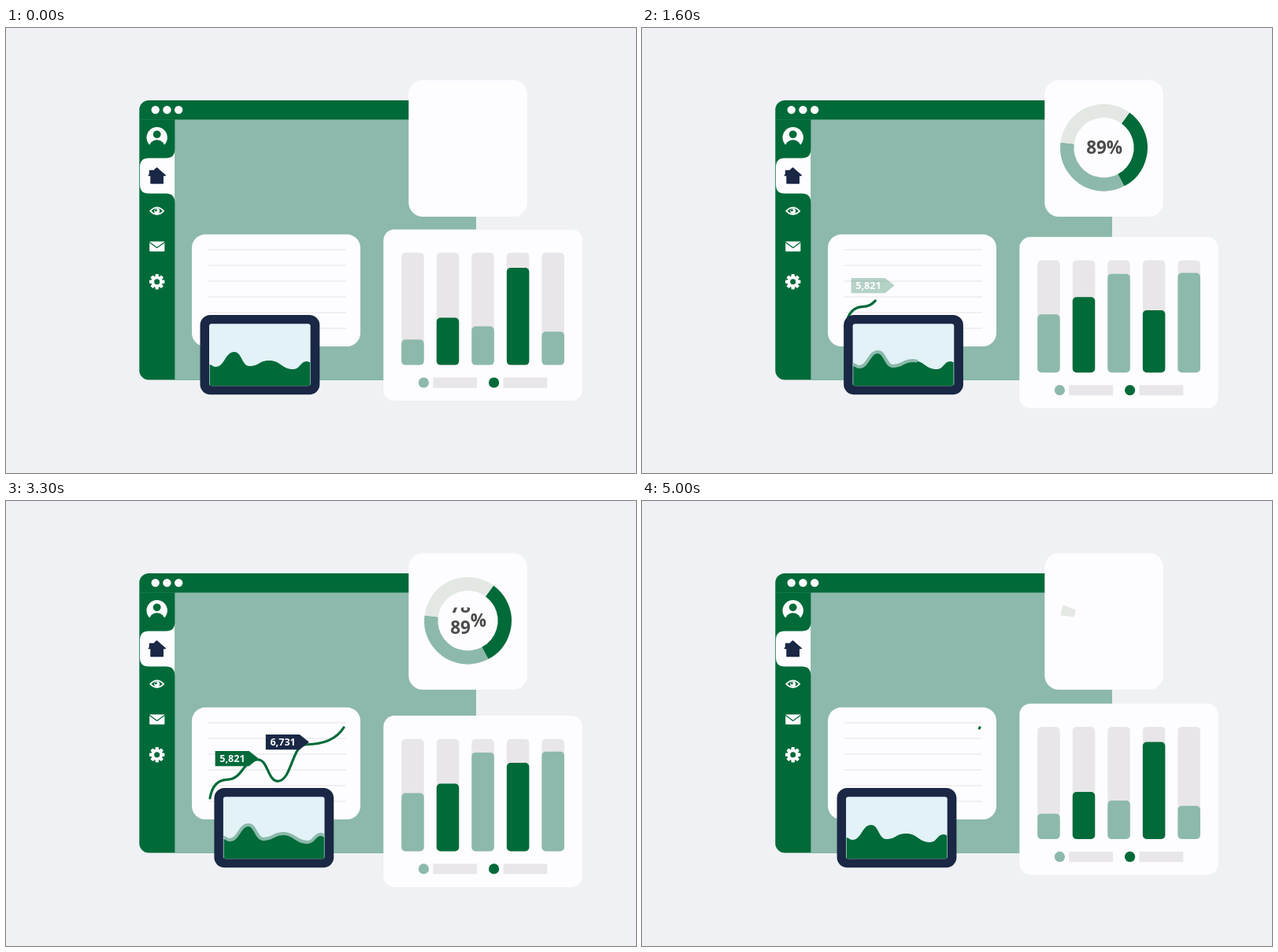
These frames come from a looping animation (800 px wide and 566 px high, 5.1 s). An HTML page with a canvas:

```html
<!DOCTYPE html>
<html lang="en">
<head>
<meta charset="utf-8">
<title>Dashboard</title>
<style>
  html, body { margin: 0; width: 100%; height: 100%; overflow: hidden; background: #eff1f4; }
  canvas { display: block; width: 800px; height: 566px; }
</style>
</head>
<body>
<canvas id="stage" width="800" height="566"></canvas>
<script>
const ctx = document.getElementById('stage').getContext('2d');
const LOOP = 5100, STEP = 100, TURN = Math.PI * 2;
const GREEN = '#006a39', TEAL = '#8cb9ab', NAVY = '#1a2745', WHITE = '#fdfcfe',
      TRACK = '#e8e6e8', MIST = '#e3e8e4', SKY = '#e2f2f7', PAPER = '#eff1f4', INK = '#4b4b4b';

// Timing helpers: everything runs between 0 and 1.
const ramp = (t, from, to) => Math.max(0, Math.min(1, (t - from) / (to - from)));
const hump = (t, from, peak, to) => Math.min(ramp(t, from, peak), 1 - ramp(t, peak, to));
const sway = (t, lastPeak) => 20.5 * (hump(t, 0, 1130, 2017) + hump(t, 2017, lastPeak, 5110));

function box(x, y, w, h, r, color) {
  ctx.fillStyle = color;
  ctx.beginPath();
  ctx.roundRect(x, y, w, h, r);
  ctx.fill();
}
function oval(x, y, rx, ry, color) {
  ctx.fillStyle = color;
  ctx.beginPath();
  ctx.ellipse(x, y, rx, ry, 0, 0, TURN);
  ctx.fill();
}
const disc = (x, y, r, color) => oval(x, y, r, r, color);
function shape(d, color) {
  ctx.fillStyle = color;
  ctx.fill(new Path2D(d));
}
function line(d, width, color) {
  ctx.strokeStyle = color;
  ctx.lineWidth = width;
  ctx.lineJoin = 'round';
  ctx.stroke(new Path2D(d));
}
function isolated(draw, x = 0, y = 0) {
  ctx.save();
  ctx.translate(x, y);
  draw();
  ctx.restore();
}
function label(text, x, y, font, color) {
  ctx.font = `${font} "Noto Sans", "Open Sans", sans-serif`;
  ctx.textAlign = 'center';
  ctx.fillStyle = color;
  ctx.fillText(text, x, y);
}

// Curve pieces that are level at each crest and trough.
const swell = points => points.slice(1).map(([x, y], i) => {
  const [x0, y0] = points[i], mid = (x0 + x) / 2;
  return `C${mid} ${y0} ${mid} ${y} ${x} ${y}`;
}).join('');

function pathLength(d) {
  const path = document.createElementNS('http://www.w3.org/2000/svg', 'path');
  path.setAttribute('d', d);
  return path.getTotalLength();
}
function strokePart(d, from, to, width, color) {
  if (to <= from) return;
  const length = pathLength(d);
  isolated(() => {
    ctx.setLineDash([(to - from) * length, 2 * length]);
    ctx.lineDashOffset = -from * length;
    ctx.lineCap = 'round';
    line(d, width, color);
  });
}

const TREND = 'M259 378C261.5 363 268 354.5 281 354.3'
  + swell([[281, 354.3], [320, 329], [345, 356.3], [381, 309.6]])
  + 'C402 309.6 419 304 429 288';
const WAVE = 'M258 428'
  + swell([[258, 428], [266, 431], [290, 412], [309, 430], [334, 423], [365, 434], [382, 424], [387, 425.5]]);

function drawSidebar() {
  shape('M214.4 154Q214.4 165.5 203 165.5H181Q170 165.5 170 177V199Q170 210.5 181 210.5H203Q214.4 210.5 214.4 222Z', WHITE);
  // avatar
  disc(191.7, 139.3, 13.2, WHITE);
  disc(191.7, 135.3, 4.9, GREEN);
  oval(191.7, 152.5, 10.2, 10.2, GREEN);
  // house
  const house = 'M191.5 178L202.3 187.5H199.3V197.5H184V187.5H181.2L182.5 186.4V181.5H186.5V182.6Z';
  shape(house, NAVY);
  line(house, 1.4, NAVY);
  // eye
  shape('M182 232.7Q191.7 222.3 201.4 232.7Q191.7 243.1 182 232.7Z', WHITE);
  shape('M184.4 232.7Q191.7 225.4 199 232.7Q191.7 240 184.4 232.7Z', GREEN);
  disc(191.7, 232.7, 3.5, WHITE);
  disc(190.3, 231.8, 1.5, GREEN);
  // mail
  box(182.2, 271.6, 19.2, 12.6, 1, WHITE);
  line('M182.2 272.4L191.8 279.6L201.4 272.4', 1.3, GREEN);
  // gear
  isolated(() => {
    for (let i = 0; i < 8; i++) {
      ctx.rotate(TURN / 8);
      box(-2.2, -9.7, 4.4, 6, 1, WHITE);
    }
    disc(0, 0, 7.2, WHITE);
    disc(0, 0, 3.5, GREEN);
  }, 191.7, 322.8);
}

function drawWindow() {
  box(169.3, 92, 427.7, 355.6, [12, 12, 0, 12], GREEN);
  box(214.4, 116.5, 382.6, 331.1, 0, TEAL);
  box(169.3, 116, 45, 0.7, 0, '#1a7850');
  for (let i = 0; i < 3; i++) disc(189.7 + i * 14.75, 104.1, 5.2, WHITE);
  drawSidebar();
}

// The lettering stays white while the plate fades on the white card.
function drawTag(x, y, color, text, alpha) {
  if (alpha <= 0) return;
  isolated(() => {
    ctx.globalAlpha = alpha;
    shape('M0 0H43L55 9.6L43 19.2H0Z', color);
    ctx.globalAlpha = 1;
    label(text, 21.8, 14.2, 'bold 12.6px', WHITE);
  }, x, y);
}

function drawNotes(t) {
  box(236, 262.6, 214, 142.4, 17, WHITE);
  for (let i = 0; i < 6; i++) box(257, 281.4 + i * 20, 175, 1.2, 0, '#e3e4e7');

  const drawn = ramp(t, 850, 2020) ** 3.4, erased = ramp(t, 3776, 5010);
  strokePart(TREND, erased, drawn, 3.2, GREEN);
  drawTag(265.6, 318, GREEN, '5,821', ramp(t, 1520, 1800) - ramp(t, 4200, 4450));
  drawTag(329.8, 297, NAVY, '6,731', ramp(t, 1700, 1950) - ramp(t, 4600, 4850));
}

function drawTablet(t) {
  isolated(() => {
    box(246.5, 365, 151.8, 101.2, 13, NAVY);
    box(258, 376.2, 128.6, 79, 3, SKY);
    ctx.clip();
    shape(WAVE + 'V455.2H258Z', GREEN);
    strokePart(WAVE, ramp(t, 3553, 5000), ramp(t, 880, 2000), 4, TEAL);
    box(258, 428, 0.6, 26, 0, SKY);
    box(386, 426, 0.6, 28, 0, SKY);
  }, sway(t, 3035));
}

function drawDonut(t) {
  box(511.3, 66.2, 150.6, 173.8, 18, WHITE);
  const shown = 360 * ramp(t, 20, 1600), erased = 360 * ramp(t, 3553, 5059);
  const angle = a => (187 - a) * TURN / 360;
  const arc = (from, to, color) => {
    const lo = Math.max(from, erased), hi = Math.min(to, shown);
    if (hi <= lo) return;
    ctx.strokeStyle = color;
    ctx.lineWidth = 17.3;
    ctx.beginPath();
    ctx.arc(586.5, 152.2, 46.75, angle(lo), angle(hi), true);
    ctx.stroke();
  };
  arc(0, 125, TEAL);
  arc(125, 241, GREEN);
  arc(241, 360, MIST);

  // counter reel: a column of numbers rolling behind a slot
  const settle = 1 - (1 - ramp(t, 150, 1350)) ** 2;
  const reel = settle * (1 - ramp(t, 3150, 3700));
  if (reel <= 0) return;
  isolated(() => {
    ctx.beginPath();
    ctx.rect(560, 135.5, 54, 34);
    ctx.clip();
    const font = 'bold condensed 22.5px';
    ['89', '78', '45'].forEach((n, i) =>
      label(n, 577, 160 - i * 26.5 + (1 - reel) * 32, font, INK));
    ctx.globalAlpha = Math.min(1, reel * 2);
    label('%', 600, 160, font, INK);
  });
}

// Bars swing from rest to goal and back; later bars start and end later.
const REST = [32.4, 60, 49, 123.5, 42.4], GOAL = [74, 96, 125.6, 73, 126.7];
function barHeight(t, i) {
  const lag = i * i, dips = GOAL[i] < REST[i];
  const fallStart = dips ? 1130 : i % 2 ? 3050 : 3300;
  const fallEnd = dips ? 3800 : fallStart + 700 + 19 * lag;
  const out = ramp(t, 42 * lag, 750 + 42 * lag);
  const back = ramp(t, fallStart, fallEnd) ** 1.2;
  return REST[i] + (GOAL[i] - REST[i]) * (out - back);
}

function drawBars(t) {
  isolated(() => {
    box(479.3, 256.2, 252.7, 217.8, 14, WHITE);
    for (let i = 0; i < 5; i++) {
      const x = 502.2 + i * 44.55, h = barHeight(t, i);
      box(x, 285.8, 28.5, 142.8, 5, TRACK);
      box(x, 428.6 - h, 28.5, h, 5, i % 2 ? GREEN : TEAL);
    }
    [TEAL, GREEN].forEach((color, i) => {
      const x = 530.4 + i * 89.2;
      disc(x, 451, 6.6, color);
      box(x + 11.9, 444.5, 55.8, 13.2, 0, TRACK);
    });
  }, 0, sway(t, 3575));
}

function draw(t) {
  box(0, 0, 800, 566, 0, PAPER);
  drawWindow();
  drawNotes(t);
  drawTablet(t);
  drawDonut(t);
  drawBars(t);
}

const start = performance.now();
function tick() {
  const t = (performance.now() - start) % LOOP;
  draw(Math.floor(t / STEP) * STEP);
  requestAnimationFrame(tick);
}
tick();
</script>
</body>
</html>
```
